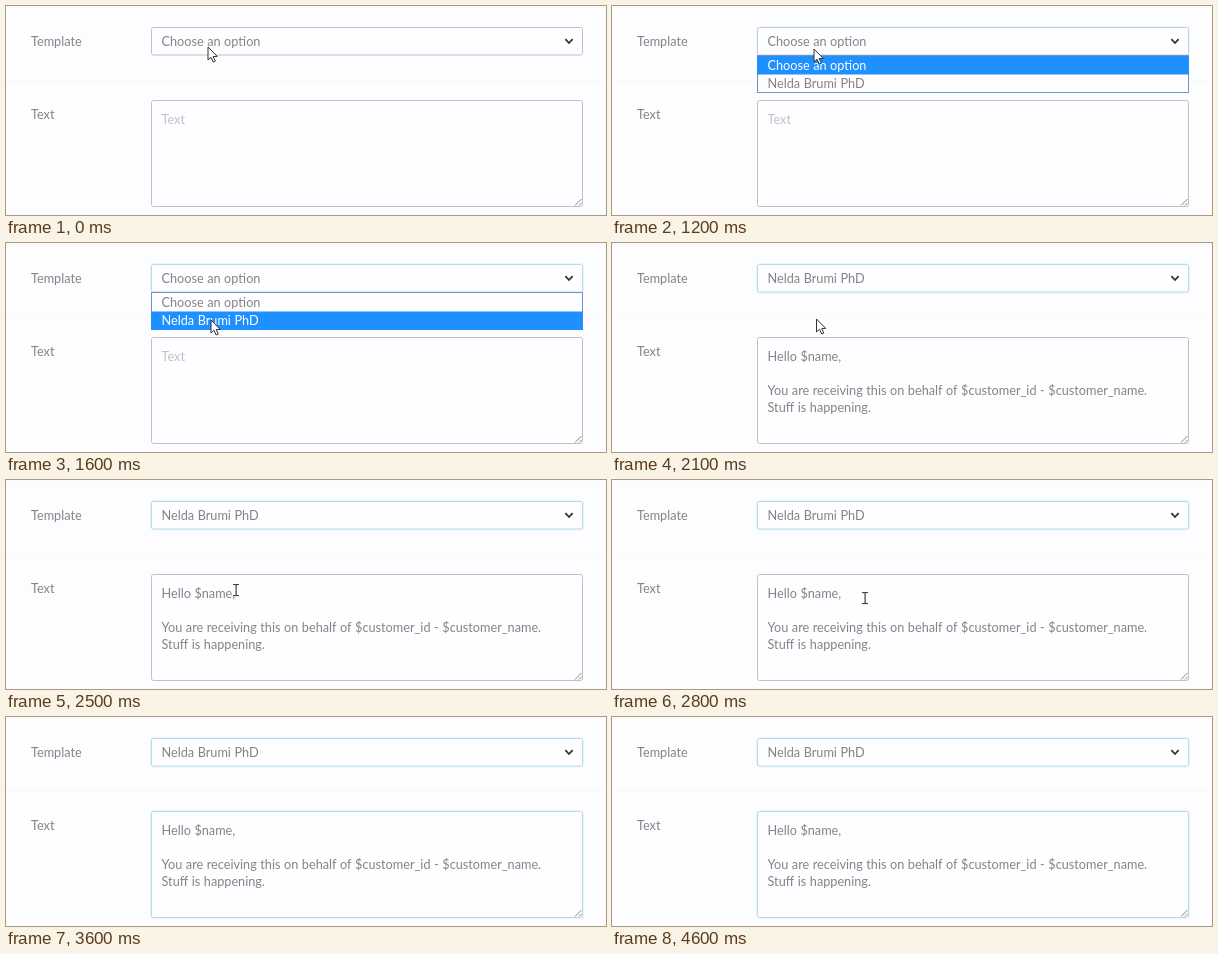
An HTML page with a canvas that plays this animation: 600 px wide and 209 px high, repeating every 4.7 s.

```html
<!DOCTYPE html>
<html lang="en">
<head>
<meta charset="utf-8">
<title>Template picker</title>
<style>
  html, body { margin: 0; width: 100%; height: 100%; overflow: hidden; background: #fdfcfe; }
  canvas { display: block; width: 600px; height: 209px; }
</style>
</head>
<body>
<canvas id="stage"></canvas>
<script>
const W = 600, H = 209, LOOP = 4700;
const canvas = document.getElementById('stage');
const ctx = canvas.getContext('2d');
const dpr = window.devicePixelRatio || 1;
canvas.width = Math.round(W * dpr);
canvas.height = Math.round(H * dpr);

const NAME = 'Nelda Brumi PhD';
const PROMPT = 'Choose an option';
const MESSAGE = [
  'Hello $name,',
  '',
  'You are receiving this on behalf of $customer_id - $customer_name.',
  'Stuff is happening.'
];
const PAGE = '#fdfcfe', RULE = '#f8f7f9';
const INK = '#858387', HINT = '#c3c1c5', BLUE = '#1e90ff';
const GREY = [194, 192, 197], FOCUS = [176, 220, 235];

// Pointer positions: start time, shape, x, y
const POINTER = [
  [0, 'arrow', 202, 41],
  [1200, 'arrow', 202, 43],
  [1300, 'arrow', 203, 49],
  [1500, 'arrow', 204, 70],
  [1600, 'arrow', 205, 77],
  [2100, 'arrow', 204.5, 76],
  [2400, 'arrow', 213, 84],
  [2500, 'beam', 230, 110],
  [2700, 'beam', 250, 116],
  [2800, 'beam', 253, 118],
  [3000, 'beam', 246, 115],
  [3100, 'none', 0, 0]
];

const clamp = v => Math.max(0, Math.min(1, v));
const mix = (a, b, k) => 'rgb(' + a.map((v, i) => Math.round(v + (b[i] - v) * k)) + ')';

function label(text, x, y, color = INK) {
  ctx.fillStyle = color;
  ctx.fillText(text, x, y);
}

function rect(x, y, w, h, color) {
  ctx.fillStyle = color;
  ctx.fillRect(x, y, w, h);
}

function line(points, color, width) {
  ctx.beginPath();
  points.forEach(([x, y]) => ctx.lineTo(x, y));
  ctx.strokeStyle = color;
  ctx.lineWidth = width;
  ctx.stroke();
}

function field(x, y, w, h, focus) {
  if (focus > 0) {
    ctx.beginPath();
    ctx.roundRect(x - 1, y - 1, w + 2, h + 2, 3);
    ctx.strokeStyle = `rgba(150, 210, 235, ${0.18 * focus})`;
    ctx.lineWidth = 1;
    ctx.stroke();
  }
  ctx.beginPath();
  ctx.roundRect(x, y, w, h, 2);
  ctx.fillStyle = '#fefdff';
  ctx.fill();
  ctx.strokeStyle = mix(GREY, FOCUS, focus);
  ctx.lineWidth = 1;
  ctx.stroke();
}

function menu(active) {
  rect(145, 49, 432, 38, '#7590c4');
  rect(146, 50, 430, 36, '#fefdff');
  rect(145, 50 + active * 18.5, 432, 18.5, BLUE);
  [PROMPT, NAME].forEach((text, i) =>
    label(text, 155.5, 63.5 + i * 18, i === active ? '#fff' : INK));
}

function arrow(x, y) {
  const shape = [[0, 0], [0, 13], [3, 10.3], [5.2, 15], [7.3, 14.1], [5.2, 9.6], [9.2, 9.4]];
  ctx.beginPath();
  shape.forEach(([px, py]) => ctx.lineTo(x + px, y + py));
  ctx.closePath();
  ctx.fillStyle = '#fff';
  ctx.fill();
  ctx.strokeStyle = '#333';
  ctx.lineWidth = 1;
  ctx.stroke();
}

function beam(x, y) {
  rect(x - 0.5, y - 6, 1.2, 12, '#444');
  rect(x - 3, y - 6, 6, 1.1, '#444');
  rect(x - 3, y + 5, 6, 1.1, '#444');
}

function draw(t) {
  const chosen = t >= 2100;
  ctx.setTransform(dpr, 0, 0, dpr, 0, 0);
  ctx.font = '12.7px Lato, "Open Sans", sans-serif';
  ctx.wordSpacing = '0.3px';
  rect(0, 0, W, H, PAGE);
  rect(0, 1, W, 1, RULE);
  rect(0, 74, W, 1, RULE);

  label('Template', 25, 39.5);
  label('Text', 25, 112.5);

  const selectFocus = t < 1200 ? 0 : t < 1300 ? 0.7 : 1;
  field(145.5, 21.5, 431, 27.5, selectFocus);
  label(chosen ? NAME : PROMPT, 155.5, 39.5);
  line([[559.4, 33.2], [563, 37], [566.6, 33.2]], '#333', 1.8);

  const textFocus = clamp((Math.floor(t / 100) - 30) / 3);
  field(145.5, 94.5, 431, 106, textFocus);
  line([[569, 199.5], [575.5, 193]], '#777', 0.9);
  line([[573, 199.5], [575.5, 197]], '#777', 0.9);
  if (chosen) MESSAGE.forEach((text, i) => label(text, 155.5, 117.5 + i * 17.3));
  else label('Text', 155.5, 117.5, HINT);

  if (t >= 1200 && !chosen) menu(t < 1500 ? 0 : 1);
  if (t >= 3100 && Math.floor((t - 3100) / 500) % 2 === 0) rect(232, 105, 1, 16, '#555');

  const [, shape, x, y] = POINTER.findLast(p => p[0] <= t);
  if (shape === 'arrow') arrow(x, y);
  if (shape === 'beam') beam(x, y);
}

const start = performance.now();
function tick() {
  draw((performance.now() - start) % LOOP);
  requestAnimationFrame(tick);
}
tick();
</script>
</body>
</html>
```
